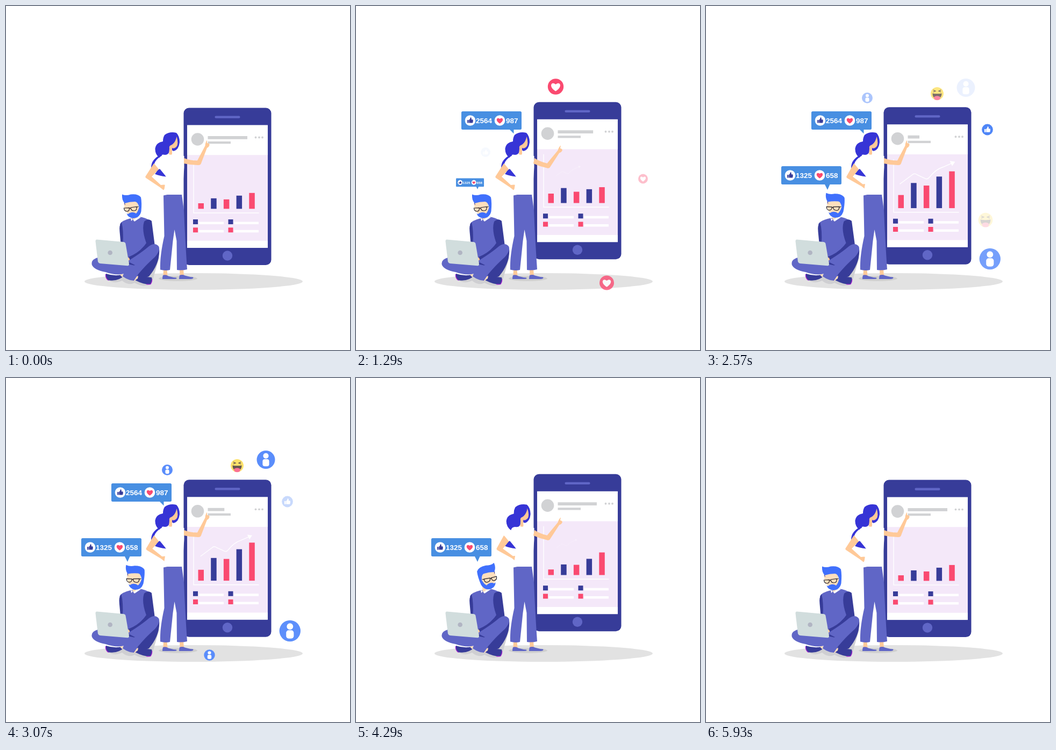
Animation, 640 px wide and 640 px high, one loop 6000 ms. Source, as an HTML page:

```html
<!DOCTYPE html>
<html lang="en">
<head>
<meta charset="utf-8">
<title>Social statistics</title>
<style>
html, body { margin: 0; width: 100%; height: 100%; overflow: hidden; background: #fff; }
svg { display: block; width: 100%; height: 100%; }
text { font: bold 13.5px "Liberation Sans", Arial, sans-serif; fill: #fff; }
.navy { fill: #373c99; }
.violet { fill: #6066c6; }
.skin { fill: #ffc998; }
.pale { fill: #ffdfbd; }
.hair { fill: #3634d6; }
.red { fill: #fa4a70; }
.grey { fill: #d1d2d4; }
.white { fill: #fff; }
.blue { fill: #488fe2; }
.line { fill: none; stroke: #fff; stroke-width: 1.4; }
</style>
</head>
<body>
<svg viewBox="0 0 640 640">
  <defs>
    <path id="heartShape" d="M0 5.7C-9.5 0-5.5-7.5 0-2.9C5.5-7.5 9.5 0 0 5.7Z"/>
    <path id="thumbShape" d="M-5.3-1H-2.9V4.6H-5.3ZM-2.2-.9Q.2-2.5.3-5.6Q2.8-6 2.2-1.7H4.6Q5.8-1 4.9 3.4Q4.5 4.6 3.4 4.6H-2.2Z"/>
    <g id="heart"><circle r="10" class="red"/><use href="#heartShape" class="white"/></g>
    <g id="like"><circle r="10" fill="#4f86f7"/><use href="#thumbShape" class="white"/></g>
    <g id="person">
      <circle r="10" fill="#5a8dfb"/>
      <circle cy="-4.2" r="3" class="white"/>
      <rect x="-3.6" y="-.6" width="7.2" height="7.8" rx="2.4" class="white"/>
    </g>
    <g id="laugh">
      <circle r="10" fill="#fde269"/>
      <path d="M-7.2-.5Q0 1 7.2-.5Q7 7.8 0 7.8T-7.2-.5Z" fill="#62534c"/>
      <path d="M-4.8 5Q0 2 4.8 5Q5.4 10.2 0 10.2T-4.8 5Z" fill="#fb6f91"/>
      <path d="M-6-5.5L-2.5-4L-6-2.5M6-5.5L2.5-4L6-2.5" fill="none" stroke="#62534c" stroke-width="1.1"/>
    </g>
    <g id="bubble">
      <rect x="196" y="196" width="112" height="34" rx="2.5" class="blue"/>
      <circle cx="212.5" cy="213" r="9.8" class="white"/>
      <circle cx="267.5" cy="213" r="9.8" class="white"/>
      <use href="#thumbShape" class="navy" x="212.5" y="213"/>
      <use href="#heartShape" class="red" x="267.5" y="213"/>
    </g>
    <g id="legend"><path d="M348 207.5h9v9h-9zM413.5 207.5h9v9h-9z"/><path class="white" d="M359 212h46v4.5h-46zM424 212h46v4.5h-46z"/></g>
  </defs>

  <ellipse cx="349" cy="512.5" rx="203" ry="15.5" fill="#e2e2e2"/>
  <ellipse cx="320" cy="507" rx="36" ry="4.8" fill="#cfcfcf"/>

  <g id="phone">
    <rect class="navy" x="330.5" width="163" height="292.5" rx="10"/>
    <rect class="violet" x="388.5" y="15" width="47" height="4.3" rx="2"/>
    <rect class="white" x="337" y="32" width="150" height="228.5"/>
    <rect x="337" y="87.7" width="150" height="159.5" fill="#f4e8f9"/>
    <circle class="violet" cx="412" cy="275" r="9.2"/>
    <g class="grey">
      <circle cx="356.5" cy="58.5" r="11.8"/>
      <rect id="title" x="375.5" y="52.5" height="5.8"/>
      <rect x="375.5" y="62.5" width="42.5" height="4.3"/>
      <circle cx="464.5" cy="55" r="1.9"/><circle cx="471" cy="55" r="1.9"/><circle cx="477" cy="55" r="1.9"/>
    </g>
    <path class="line" d="M349 97V195.5H470.5"/>
    <g id="bars"></g>
    <g id="trend">
      <path class="line" d="M-20 9.5L3-7.5Q7-11.5 12-8L26-1.5Q31 2 35-3Q47-18 60-22L76-29"/>
      <path class="white" d="M83-32L77.5-24L73-33.5Z"/>
    </g>
    <use href="#legend" class="navy"/>
    <use href="#legend" class="red" y="15.3"/>
  </g>

  <g id="woman">
    <path class="skin" d="M293 489H299.5L300.5 502H292.5ZM323 489H330L331 502H323.5Z"/>
    <path class="violet" d="M292 501Q297 499 302 502.5Q310 505 317 505.5Q319 508 313 508H291Q291 504 292 501ZM323 501Q328 499 333 501.5Q341 504 348 504.5Q350 507 344 508H322Q322 504 323 501Z"/>
    <path class="violet" d="M293 352.5Q310 347.5 327 350.5L331 380Q333 430 337 490Q328 492.5 318 491L317.5 437L313.5 416L310.5 437L305 491Q296 493 287 490.5Q286 465 294.5 428Z"/>
    <path id="curl" class="hair" d="M290 276Q270 284 270 301Q274 304 277 292L290 286Z"/>
    <path class="hair" d="M282 298L298 317.5Q285 316 277 312.5Q282 308 282 298Z"/>
    <path id="elbow" class="skin"/>
    <path class="white" d="M304 275L289 279Q278 286 276 293.5L284.5 304L289 301L298 318L293 351H328L331.5 300V279L310 276Z"/>
    <g id="womanHead">
      <path class="hair" d="M295 240Q304 233 317 236Q323 242 323 253Q322 267 312 270L308 268L304 262Q306 277 296 277Q288 275 285.5 282.5Q277 276 277.5 265Q279 254 292 252Q292 245 295 240Z"/>
      <path class="skin" d="M317.5 243Q321.5 257 317 262Q313 266 309 264V275Q309 278 303 276L304 265Q303 260 307 259Q315 255 317.5 243Z"/>
    </g>
    <path id="arm" class="skin" d="M331 283Q345 288 356 287.5L370.5 260Q371 253 374 249.5L374 255Q379 255 378.5 259Q377 263 374 264L362.5 294Q361 296.5 357 296Q344 296 331 293Z"/>
  </g>

  <g id="man">
    <path fill="#cfcfd2" d="M187 507Q200 519 216 511Q228 521 239 515Q262 527 272 513L285 468L250 490Z"/>
    <path class="navy" d="M225 478L285 452Q287 478 266 503Q256 508 240 505L220 490Z"/>
    <g id="torso">
      <path class="violet" d="M212 406Q215 399 232 395L250 392.5Q262 394 268 400L272 446L228 472L216 465Z"/>
      <path class="navy" d="M215 402Q210 408 211.5 420L213.5 442H217.5Q219 418 215 402Z"/>
      <path class="navy" d="M257 401Q265 394 271 400L276.5 443Q255 464 230 474L228 467Q249 459 261 441Q252 416 257 401Z"/>
    </g>
    <path class="skin" d="M225 467L229 468.5L231 474L227 479Z"/>
    <path class="pale" d="M235 384H246L244 394L238 400L235 395Z"/>
    <path class="white" d="M232 394L237 398L246 392.5L251 393L239 401L236 397L233 400Z"/>
    <path class="navy" d="M186 498Q200 503 217 500L216 505Q204 513 189 510Q184 505 186 498ZM240 507Q255 502 271 505Q273 512 269 517.5Q257 519 240 510Z"/>
    <path d="M185.5 499Q185 507 191 510.5M271.5 508Q272 513 269 517.5Q265 518.5 261 517.5" fill="none" stroke="#a51bd0" stroke-width="1.2"/>
    <path class="pale" d="M212 496L220 502L216 504Q211 501 212 496ZM236 505L246 502L245 507L238 512Z"/>
    <path class="violet" d="M171 468Q157 472 160 482Q164 491 185 495Q205 502 220 498L240 483Z"/>
    <path class="violet" d="M226 475Q252 459 266 447Q277 439 284 447Q288 454 277 467Q258 484 246 499L238 511Q228 511 217 503Q222 488 240 482Z"/>
    <path d="M169 434.5L219 439Q222 439.3 222.5 442L229 480Q229 483.5 226 483.3L175 479Q172 478.5 171 475.5L166.5 438Q166.3 434.5 169 434.5Z" fill="#d1dddd"/>
    <circle cx="193.7" cy="459" r="4.3" fill="#b1b5c3"/>
    <g id="manHead">
      <path class="pale" d="M220 364L244 361L248 380Q243 391 230 388Q221 384 220 372Z"/>
      <path fill="#4070fc" d="M216 350.5Q223 353.5 232 350.5Q246 349 251 356Q253 366 251.5 382Q249 394 237 395Q227 394 224.5 386Q228 388 229 385.5Q236 382 242 386Q246 382 247.5 374Q245 364 240 364Q230 364 221 367Q215 361 216 350.5Z"/>
      <path d="M219.5 376L229.5 375.5Q230 382 225 382T219.5 376ZM232 375L243 373.5Q244 381 238 381T232 375ZM229.5 377Q231 375.5 232 377M243 374.5L246.5 373" fill="none" stroke="#25252c" stroke-width="1.2"/>
      <path d="M220 366L221.5 370" stroke="#373c99"/>
    </g>
  </g>

  <g id="bubbleA">
    <path class="blue" d="M285 229H293.5V237.5Z"/>
    <use href="#bubble"/>
    <text x="223" y="218">2564</text><text x="279" y="218">987</text>
  </g>
  <g id="bubbleB">
    <path class="blue" d="M220.5 331H231L226 342Z"/>
    <use href="#bubble" x="-56" y="102"/>
    <text x="167" y="320">1325</text><text x="223" y="320">658</text>
  </g>
  <g id="icons"></g>
</svg>
<script>
const LOOP = 6000;
const $ = id => document.getElementById(id);
const set = (el, name, value) => el.setAttribute(name, value);

function add(parent, tag, attrs) {
  const el = document.createElementNS('http://www.w3.org/2000/svg', tag);
  for (const name in attrs) set(el, name, attrs[name]);
  return parent.appendChild(el);
}

const ease = x => (1 - Math.cos(Math.PI * Math.min(1, Math.max(0, x)))) / 2;
const ramp = (t, start, end) => ease((t - start) / (end - start));
// Rises from a to b, holds, and falls from c to d.
const pulse = (t, a, b, c, d) => ramp(t, a, b) - ramp(t, c, d);

const bars = [10.3, 19.5, 17.5, 24.5, 29.5].map((low, i) => ({
  low,
  el: add($('bars'), 'rect', { x: 357.5 + 23.7 * i, width: 10.5, class: i % 2 ? 'navy' : 'red' })
}));

// Every icon fades in, stays and fades out at the same pace.
const FADE = 450, STAY = 790;
const icons = [];
function icon(kind, x, y, r, start) {
  const transform = `translate(${x} ${y}) scale(${r / 10})`;
  icons.push({ start, el: add($('icons'), 'use', { href: '#' + kind, transform }) });
}
icon('heart', 371.5, 150, 14.7, 750);
icon('heart', 466.5, 515, 13.5, 975);
icon('heart', 534, 321.5, 9, 1110);
icon('like', 241, 272, 9, 1230);
icon('laugh', 520, 398, 13.3, 1480);
icon('like', 523.5, 230, 10.4, 2000);
icon('laugh', 430, 163, 12, 2240);
icon('person', 528.3, 470.5, 19.7, 2240);
icon('person', 300, 171, 10, 2345);
icon('person', 483.5, 152, 17, 2470);
icon('person', 378.5, 515.5, 10.2, 2620);

function scaleAt(id, x, y, sx, sy = sx) {
  set($(id), 'transform', `translate(${x} ${y}) scale(${sx} ${sy}) translate(${-x} ${-y})`);
}

function drawPhone(t) {
  const y = 184.1 + 5.5 * Math.cos(2 * Math.PI * (t + 90) / 3000);
  set($('phone'), 'transform', `translate(0 ${y})`);
  set($('title'), 'width', 73.5 - 52 * pulse(t, 880, 2500, 2535, 4465));
  bars.forEach(({ el, low }, i) => {
    const up = 540 + 190 * i, down = 2400 + 190 * i;
    const h = low * (1 + 1.4 * pulse(t, up, up + 1500, down, down + 1800));
    set(el, 'y', 187.8 - h);
    set(el, 'height', h);
  });
  const size = .02 + .98 * pulse(t, 600, 2100, 2600, 5450);
  set($('trend'), 'transform', `translate(380.5 133.5) scale(${size})`);
  set($('trend'), 'opacity', size);
}

function drawWoman(t) {
  const point = pulse(t, 500, 1290, 1500, 2400) + pulse(t, 3450, 4250, 4450, 5330);
  set($('arm'), 'transform', `rotate(${12 * point} 331 288)`);

  const e = 2 * pulse(t, 1500, 2500, 2700, 3600) + 3 * pulse(t, 3600, 4650, 5150, 5850);
  const hand = (x, y) => `${x + 1.8 * e} ${y - .8 * e}`;
  set($('elbow'), 'd', `M275 293L${259.5 + e} 317Q${258.5 + e} 319 ${262 + e} 321L${hand(286, 337)}L${hand(293, 342.5)}` +
    `L${hand(297, 338)}Q${hand(299, 333)} ${hand(294, 332.5)}L${hand(288, 333)}L${271 + e} 317.5L286 302Z`);

  const turn = pulse(t, 3600, 4250, 4400, 5050);
  set($('womanHead'), 'transform', `translate(${2.5 * turn} 0) rotate(${-2 * turn} 306 276)`);
  set($('curl'), 'transform', `translate(${11 * turn} 0)`);
}

function drawMan(t) {
  const look = pulse(t, 1500, 2500, 3100, 3740);
  const turn = pulse(t, 3100, 3740, 4520, 5120);
  const x = 236 + 3 * look + 14.5 * turn + 5 * Math.sin(Math.PI * turn) * ramp(t, 3000, 3100);
  const y = 392 - look - 2.5 * turn;
  set($('manHead'), 'transform',
    `translate(${x} ${y}) rotate(${6 * look - 18 * turn}) scale(${1 - 2 * turn} 1) translate(-236 -392)`);
  scaleAt('torso', 270, 440, 1 + .05 * pulse(t, 1950, 2500, 2650, 3250), 1);
}

function draw(now) {
  const t = now % LOOP;
  drawPhone(t);
  drawWoman(t);
  drawMan(t);
  scaleAt('bubbleA', 293, 237, pulse(t, 620, 1220, 3285, 4075));
  scaleAt('bubbleB', 226, 340, pulse(t, 1000, 1610, 4510, 5130));
  for (const { el, start } of icons) {
    const out = start + STAY;
    set(el, 'opacity', pulse(t, start, start + FADE, out, out + FADE));
  }
}

const begin = performance.now();
function tick() {
  draw(performance.now() - begin);
  requestAnimationFrame(tick);
}
tick();
</script>
</body>
</html>
```
